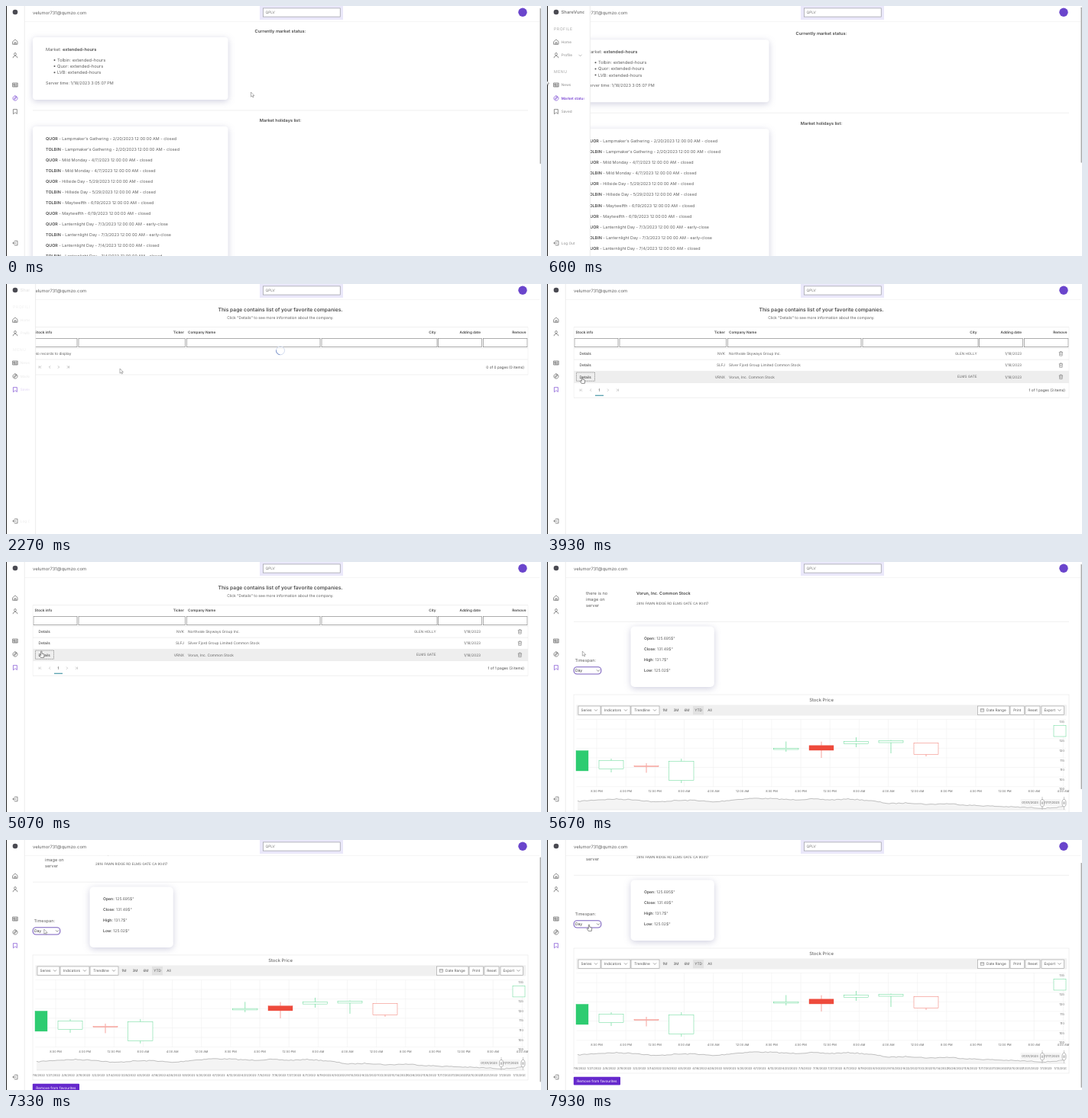
Write an HTML page that moves like this. It is 700 px wide and 328 px high and loops after 7990 ms.

```html
<!DOCTYPE html>
<html lang="en">
<head>
<meta charset="utf-8">
<title>Market dashboard</title>
<style>
html, body { margin: 0; width: 100%; height: 100%; overflow: hidden; background: #fff; }
svg { display: block; width: 700px; height: 328px; font-family: Inter, "Open Sans", sans-serif; }
text { white-space: pre; text-rendering: geometricPrecision; }
.card { fill: #fff; filter: drop-shadow(0 2px 4px rgba(70, 70, 130, .26)); }
.icon { fill: none; stroke: #555; stroke-width: .65; stroke-linejoin: round; stroke-linecap: round; }
.item { fill: #777; }
.active .icon { stroke: #7340d0; }
.active .item { fill: #6528cc; font-weight: 600; }
</style>
</head>
<body>
<svg id="stage" viewBox="0 0 700 328"></svg>
<script>
const LOOP = 7990, STEP = 1000 / 15;
const PURPLE = '#6528cc', GREEN = '#2ecc71', RED = '#ee4a3c';
const $ = id => document.getElementById(id);

// y is the vertical middle of the text line
function txt(x, y, str, size, o = {}) {
  const attr = `font-size="${size}" fill="${o.fill || '#606060'}" text-anchor="${o.at || 'start'}" font-weight="${o.w || 400}"`;
  return `<text x="${x}" y="${(y + size * .36).toFixed(2)}" ${attr} ${o.more || ''}>${str}</text>`;
}
const bold = s => `<tspan font-weight="600" fill="#4c4c4c">${s}</tspan>`;
function rect(x0, y0, x1, y1, fill, more = '') {
  return `<rect x="${x0}" y="${y0}" width="${x1 - x0}" height="${y1 - y0}" fill="${fill}" ${more}/>`;
}
const box = (x0, y0, x1, y1, stroke, sw = .7, fill = '#fff') =>
  rect(x0, y0, x1, y1, fill, `stroke="${stroke}" stroke-width="${sw}"`);
const path = (d, stroke, sw = .7, fill = 'none', more = '') =>
  `<path d="${d}" stroke="${stroke}" stroke-width="${sw}" fill="${fill}" ${more}/>`;
const hline = (x0, x1, y, c = '#e6e6e6') => path(`M${x0} ${y}H${x1}`, c, .6);
const down = (x, y, c = '#666') => path(`M${x - 2} ${y - 1}l2 2l2 -2`, c, .6);

const LIST = [
  ["Lampmaker's Gathering", '2/20'], ['Mild Monday', '4/7'], ['Hillside Day', '5/29'],
  ['Maytwelfth', '6/19', 1], ['Lanternlight Day', '7/3'], ['Lanternlight Day', '7/4']
];

function marketPage() {
  const mid = { at: 'middle', w: 600, fill: '#4c4c4c' };
  let s = txt(359, 33, 'Currently market status:', 5.7, mid);
  s += rect(35, 41, 290.5, 123, '#fff', 'rx="4" class="card"');
  s += txt(52, 56.5, 'Market: ' + bold('extended-hours'), 5.7);
  ['Tolbin', 'Quor', 'LVB'].forEach((name, i) => {
    const y = 71 + 8.1 * i;
    s += `<circle cx="63.5" cy="${y}" r="1" fill="#555"/>` + txt(67, y, name + ': extended-hours', 5.75);
  });
  s += txt(52, 101, 'Server time: 1/18/2023 3:05:07 PM', 5.45);
  s += hline(35, 683, 137) + txt(359, 150.3, 'Market holidays list:', 5.6, mid);
  s += rect(35, 158, 290.5, 400, '#fff', 'rx="4" class="card"');
  LIST.forEach(([name, day, swap], i) => {
    const end = day === '7/3' ? 'early-close' : 'closed';
    for (let k = 0; k < 2; k++) {
      const market = (k === 1) !== !!swap ? 'TOLBIN' : 'QUOR';
      s += txt(52, 174 + 14.05 * (2 * i + k), `${bold(market)} - ${name} - ${day}/2023 12:00:00 AM - ${end}`, 5.4);
    }
  });
  return s;
}

function pager(y, total, pages) {
  const c = pages ? '#aaa' : '#999';
  const left = x => `M${x + 1} ${y - 1.6}l-1.6 1.6l1.6 1.6`;
  const right = x => `M${x - 1} ${y - 1.6}l1.6 1.6l-1.6 1.6`;
  const x = pages ? 80 : 69, z = pages ? 92 : 81;
  return path(`${left(45)}M43.2 ${y - 1.6}v3.2${left(57)}${right(x)}${right(z)}M${z + 1.4} ${y - 1.6}v3.2`, c, .6) +
    (pages ? txt(68.5, y, '1', 4.8, { at: 'middle', fill: '#333' }) + rect(63, y + 6.5, 74, y + 7.6, '#3a8fa0') : '') +
    txt(678, y, `${pages} of ${pages} pages (${total} items)`, 4.76, { at: 'end', fill: '#444' }) +
    hline(35, 683, y + 10) + path(`M35.2 56.5V${y + 10}M683 56.5V${y + 10}`, '#eee', .6);
}

function savedPage() {
  const head = { w: 600, fill: '#444' }, end = { ...head, at: 'end' };
  let s = txt(359, 33.4, 'This page contains list of your favorite companies.', 6.7, { at: 'middle', w: 600, fill: '#4c4c4c' });
  s += txt(359, 43.8, 'Click "Details" to see more information about the company.', 5, { at: 'middle' });
  s += hline(35, 683, 56.5) + txt(37.5, 63.6, 'Stock info', 4.7, head) + txt(238, 63.6, 'Company Name', 4.7, head);
  [[233, 'Ticker'], [562.5, 'City'], [621, 'Adding date'], [680.5, 'Remove']].forEach(([x, t]) => s += txt(x, 63.6, t, 4.7, end));
  [[36, 93], [95, 234.5], [236.5, 411], [413, 564], [565.5, 622.5], [624.5, 682]].forEach(([a, b]) => s += box(a, 71.3, b, 82.7, '#777', .6));
  s += hline(35, 683, 84.3);

  let rows = '';
  [['NVK', 'Northvale Skyways Group Inc.', 'GLEN HOLLY'],
   ['SLFJ', 'Silver Fjord Group Limited Common Stock', ''],
   ['VRNX', 'Vorun, Inc. Common Stock', 'ELMS GATE']].forEach(([tick, name, city], i) => {
    const y = 91.4 + 15.2 * i, r = { at: 'end', fill: '#666' };
    rows += rect(35, y - 7.4, 683, y + 7.8, '#eee', `id="row${i}"`);
    rows += txt(42.5, y, 'Details', 4.8, { fill: '#333' }) + txt(233, y, tick, 4.75, r);
    rows += txt(238, y, name, 4.75) + txt(562.5, y, city, 4.6, r) + txt(621, y, '1/18/2023', 4.75, r);
    rows += path(`M669.8 ${y - 1.8}h5.2M671.5 ${y - 1.8}v-1h1.8v1M670.4 ${y - 1.8}l.3 4.6h3.4l.3 -4.6M671.7 ${y - .6}v2.2M673.1 ${y - .6}v2.2`, '#666', .5);
    rows += hline(35, 683, y + 7.8);
  });
  rows += path('M38.5 116h24v11.3h-24z', '#777', .7, 'none', 'id="focus" stroke-dasharray="1 .6"') + pager(139.2, 3, 1);
  s += `<g id="rows">${rows}</g><g id="empty">${txt(37.5, 91.6, 'No records to display', 4.75)}${hline(35, 683, 99)}${pager(109, 0, 0)}` +
    `<circle cx="359" cy="87.3" r="5.5" fill="none" stroke="#d3dcf0" stroke-width="1"/>` +
    path('M359 81.8a5.5 5.5 0 0 1 5.5 5.5', '#7f97cc', 1, 'none', 'id="spin"') + '</g>';
  return s;
}

// x from, x to, body top, body bottom, wick top, wick bottom, colour, solid
const CANDLES = [
  [38, 54, 247.5, 274, 247.5, 274, GREEN, 1], [68, 100, 260.5, 271.5, 258, 276, GREEN],
  [114, 146, 267.6, 268.6, 264, 276.5, RED], [159.5, 192, 261.5, 286.5, 258, 290, GREEN],
  [296.5, 329, 244.2, 246, 235.5, 249, GREEN], [343, 375, 240.8, 247, 235.7, 257, RED, 1],
  [388.5, 420.5, 235.6, 238.2, 230, 243, GREEN], [434, 466, 234.6, 237, 233.5, 251, GREEN],
  [480, 512, 237.6, 252.5, 237.6, 255, RED], [663, 679, 214.5, 229, 214.5, 229, GREEN]
];

function chart() {
  const mid = { fill: '#555', at: 'middle' };
  let s = box(35, 174, 683, 338, '#e6e6e6', .6) + txt(359, 181, 'Stock Price', 5.9, mid);
  s += rect(38.5, 187.5, 680, 201.5, '#f0f0f0') + rect(191, 189, 205, 200.3, '#e2e2e2');
  [[41, 70, 'Series', 1], [71, 109, 'Indicators', 1], [110, 147, 'Trendline', 1], [563.5, 605, 'Date Range'],
   [606, 624.5, 'Print'], [626, 645, 'Reset'], [647, 676.5, 'Export', 1]].forEach(([a, b, t, menu]) => {
    const shift = menu ? -4 : t === 'Date Range' ? 3.6 : 0;
    s += box(a, 189, b, 200.3, '#999', .6) + txt((a + b) / 2 + shift, 194.6, t, 4.7, mid);
    if (menu) s += down(b - 6, 194.4);
  });
  s += path('M567.2 192.6h4.4v3.8h-4.4zM567.2 194h4.4', '#666', .5);
  [[154.5, '1M'], [169, '3M'], [183, '6M'], [198, 'YTD'], [213, 'All']].forEach(([x, t]) => s += txt(x, 194.6, t, 4.7, mid));

  for (let i = 0; i < 8; i++) {
    const y = 206.5 + 12.6 * i;
    s += hline(38.5, 679, y, '#f0f0f0') + txt(677, y + 3.2, 135 - 5 * i, 4, { at: 'end' });
  }
  const hours = ['8:00 PM', '4:00 PM', '12:00 PM', '8:00 AM', '4:00 AM', '12:00 AM'];
  for (let i = 0; i < 17; i++) {
    const x = 65 + 38.15 * i;
    s += path(`M${x} 206.5V294.7`, '#f0f0f0', .6) + txt(x, 301, hours[i % 6], 3.9, { at: 'middle' });
  }
  CANDLES.forEach(([a, b, top, bot, hi, lo, c, solid]) => {
    const m = (a + b) / 2;
    const shape = path(`M${m} ${hi}V${top}M${m} ${bot}V${lo}`, c, .6) + box(a, top, b, bot, c, .45, solid ? c : '#fff');
    s += `<g stroke-opacity=".85">${shape}</g>`;
  });
  return s + rangeBar();
}

function rangeBar() {
  const knots = [314, 312, 311, 312, 315, 313, 312.5, 315, 312, 310, 310.5, 312, 311, 312, 311, 313, 317, 316, 318, 317, 319, 320, 321, 322, 323, 321];
  let seed = 7, line = '';
  const rnd = () => (seed = seed * 16807 % 2147483647) / 2147483647 - .5;
  for (let x = 40; x <= 677; x += 3) {
    const p = (x - 40) / 25.5, i = Math.min(24, Math.floor(p));
    const y = knots[i] + (knots[i + 1] - knots[i]) * (p - i) + 1.2 * rnd();
    line += `${line ? 'L' : 'M'}${x} ${y.toFixed(1)}`;
  }
  let s = path(`${line}V325H40Z`, 'none', 0, '#f4f4f4') + path(line, '#999', .6) + hline(40, 679, 325, '#ddd');
  [[632, '01/01/2023'], [660, '01/17/2023']].forEach(([x, t]) => {
    s += rect(x - 12.5, 311, x + 12.5, 320.5, '#f6f6f6', 'rx="1"') + txt(x, 315.7, t, 4.1, { at: 'middle' });
  });
  [648, 676.5].forEach(x => {
    s += path(`M${x} 308V325`, '#aaa', .6) + `<ellipse cx="${x}" cy="316.2" rx="2.6" ry="4.8" fill="#fff" stroke="#888" stroke-width=".6"/>` +
      path(`M${x - .7} 314.5v3.4M${x + .7} 314.5v3.4`, '#666', .5);
  });
  let dates = '';
  for (let i = 0; i < 33; i++) {
    const d = new Date(2022, 0, 16 + Math.round(11.3 * i));
    dates += txt(42 + 19.7 * i, 332, `${d.getMonth() + 1}/${d.getDate()}/${d.getFullYear()}`, 3.9, { at: 'middle' });
  }
  return `${s}<g clip-path="url(#axis)">${dates}</g>`;
}

function detailPage() {
  let s = '';
  ['there is no', 'image on', 'server'].forEach((t, i) => s += txt(51, 41 + 8.2 * i, t, 5.7));
  s += txt(117, 41, 'Vorun, Inc. Common Stock', 5.5, { w: 600, fill: '#444' });
  s += txt(117, 54.3, '2816 FAWN RIDGE RD ELMS GATE CA 90417', 4.5);
  s += hline(35, 683, 78.3) + rect(109.5, 84.5, 218.8, 164, '#fff', 'rx="5" class="card"');
  [['Open', '125.695'], ['Close', '131.49'], ['High', '131.7'], ['Low', '125.02']].forEach(([k, v], i) => {
    s += txt(127, 100.3 + 14 * i, `${bold(k + ':')} ${v}$"`, 5.1);
  });
  s += txt(36.5, 129.3, 'Timespan:', 5.6);
  s += rect(35.2, 137.8, 70.8, 147, '#fff', 'rx="4" stroke="#7a5fbe" stroke-width="1.1"');
  s += txt(37, 142.4, 'Day', 5, { fill: '#333' }) + down(67, 142.4, '#444');
  s += chart() + rect(34.8, 342.8, 96, 353.6, PURPLE, 'rx="1"') + txt(65.4, 348.2, 'Remove from favourites', 4.65, { at: 'middle', fill: '#fff' });
  return s;
}

function header() {
  return rect(24, 0, 698, 20.5, '#fff') + hline(24, 698, 20.5, '#eee') + txt(35, 9, 'velumor731@qumzo.com', 5.9) +
    rect(332, 0, 441, 18, '#eae8fa') + box(336.4, 2.9, 437.2, 14.1, '#8c8c94', .6) + txt(339.5, 8.7, 'QPLV', 4.8, { fill: '#777' }) +
    `<circle cx="676" cy="8.2" r="5.7" fill="#6a45cc"/>`;
}

const ICONS = [
  ['home', 47, 'Home', 'M9 46.5L12 44L15 46.5V50.2H9ZM11 50.2V47.8H13V50.2'],
  ['user', 64.6, 'Profile', 'M12 61.6a1.5 1.5 0 1 1 -.01 0M9.2 67.8c0 -3.4 5.6 -3.4 5.6 0'],
  ['news', 103.3, 'News', 'M9 101h6.2v5H9ZM10.2 102.4h1.8v1.6h-1.8ZM13.2 102.5h1M13.2 104h1M10.2 105h4'],
  ['market', 121, 'Market status', 'M12 117.9a3.1 3.1 0 1 1 -.01 0M13.5 119.5l-.9 2.1l-2.1 .9l.9 -2.1Z'],
  ['saved', 138.5, 'Saved', 'M9.8 135.6h4.6v5.9l-2.3 -1.8l-2.3 1.8Z'],
  ['out', 311, 'Log Out', 'M11.4 308.2H15V313.9H11.4M13 311H9M10.5 309.5L9 311L10.5 312.5']
];

function sidebar() {
  const caps = { fill: '#999', more: 'letter-spacing=".5"' };
  let s = rect(0, 0, 24, 328, '#fff', 'id="panel"') + path('M24.3 0V328', '#e4e4e4', .7, 'none', 'id="edge"');
  s += `<circle cx="12" cy="8" r="3.3" fill="#4a4a52"/>`;
  let labels = txt(18.5, 8, 'ShareVund', 5.9, { w: 600, fill: '#666' }) + txt(9, 30, 'PROFILE', 5.2, caps) + txt(9, 86.2, 'MENU', 5.2, caps);
  labels += `<g id="chev">${down(0, 64.8, '#777')}</g>`;
  // labels sit in their own clipped layer, tied to their icon by data-nav
  ICONS.forEach(([id, y, name, d]) => {
    s += `<g data-nav="${id}"><path class="icon" d="${d}"/></g>`;
    labels += `<g data-nav="${id}"><text class="item" x="18.8" y="${y + 1.7}" font-size="4.7">${name}</text></g>`;
  });
  return `${s}<g clip-path="url(#cut)"><g id="labels">${labels}</g></g>` + rect(0, 0, 1, 328, '#222');
}

const ARROW = path('M0 0V6.2L1.5 4.9L2.5 7L3.5 6.5L2.5 4.5H4.4Z', '#666', .5, '#fff', 'id="arrow"');
const HAND = path('M-.7 .6C-.7 -.3 .7 -.3 .7 .6V3.2L3 3.7Q3.8 4 3.7 5L3.3 8.4H-.8L-2.6 5.6Q-2.6 4.6 -1.6 4.9L-.7 5.6Z', '#444', .6, '#fff', 'id="hand"');

$('stage').innerHTML = `<defs><clipPath id="cut"><rect id="cutBox" x="0" y="0" width="16" height="328"/></clipPath>
  <clipPath id="axis">${rect(35, 326, 680, 338, '#fff')}</clipPath></defs>
  ${rect(0, 0, 700, 328, '#fff')}<g id="market">${marketPage()}</g><g id="saved">${savedPage()}</g><g id="detail">${detailPage()}</g>
  ${header()}${rect(698.6, 0, 699.8, 10, '#999', 'id="thumb" rx=".6"')}${sidebar()}<g id="cursor">${ARROW}${HAND}</g>`;

const TRACK = [
  [0, 320.5, 113], [70, 317, 113], [400, 20, 100], [530, -1.5, 97], [800, -1.5, 97], [870, 26, 112], [1130, 40, 121],
  [1250, 40, 121], [1600, 34, 137], [1870, 34, 138], [2000, 82, 132], [2266, 149, 111], [2600, 151, 112], [2740, 151, 112],
  [3530, 46, 124], [3660, 46, 122], [4200, 46, 122], [4333, 46.3, 117], [6870, 46.3, 117], [6933, 49.8, 117],
  [7810, 49.8, 117], [7933, 55, 111]
];

function along(keys, t) {
  const i = keys.findIndex(k => k[0] > t);
  if (i < 0) return keys[keys.length - 1].slice(1);
  const a = keys[i - 1], b = keys[i], p = (t - a[0]) / (b[0] - a[0]);
  return a.slice(1).map((v, j) => v + (b[j + 1] - v) * p);
}

// cubic-bezier(.25, .1, .25, 1), solved by bisection
function ease(p) {
  if (p <= 0 || p >= 1) return Math.min(1, Math.max(0, p));
  const bez = (a, b, u) => 3 * a * u * (1 - u) ** 2 + 3 * b * u * u * (1 - u) + u ** 3;
  let lo = 0, hi = 1;
  for (let i = 0; i < 20; i++) {
    const m = (lo + hi) / 2;
    if (bez(.25, .25, m) < p) lo = m; else hi = m;
  }
  return bez(.1, 1, lo);
}

const show = (id, on) => $(id).setAttribute('display', on ? 'inline' : 'none');
const move = (id, x, y) => $(id).setAttribute('transform', `translate(${x} ${y})`);

function draw(ms) {
  const t = Math.min(119, Math.floor((ms + 4) / STEP)) * STEP + .5;
  const page = t < 2066 ? 'market' : t < 5600 ? 'saved' : 'detail';
  ['market', 'saved', 'detail'].forEach(id => show(id, id === page));

  const rise = 3.3 * ease((t - 20) / 220);
  const [scroll] = along([[0, 0], [7170, 0], [7200, 5], [7400, 32]], t);
  move('market', 0, rise);
  move('detail', 0, -scroll);

  const top = page === 'market' ? 3 - rise * .4 : 3 + scroll * .84;
  show('thumb', page !== 'saved');
  $('thumb').setAttribute('y', top);
  $('thumb').setAttribute('height', page === 'market' ? 204 : 295);

  const open = t < 2000 ? ease((t - 400) / 600) : 1 - ease((t - 2000) / 600);
  const w = 24.5 + 55.5 * open;
  $('panel').setAttribute('width', w);
  move('edge', w - 24.5, 0);
  $('cutBox').setAttribute('width', w - 8);
  $('labels').setAttribute('opacity', Math.min(1, Math.max(0, 2.2 * open - .42)));
  move('chev', w - 13, 0);
  const nav = page === 'market' ? 'market' : 'saved';
  document.querySelectorAll('[data-nav]').forEach(g => g.setAttribute('class', g.dataset.nav === nav ? 'active' : ''));

  const [x, y] = along(TRACK, t);
  const loaded = t >= 2400;
  show('rows', loaded);
  show('empty', !loaded);
  $('spin').setAttribute('transform', `rotate(${t * .4} 359 87.3)`);
  for (let i = 0; i < 3; i++) show('row' + i, Math.floor((y - 84) / 15.2) === i);
  show('focus', t >= 3600);

  const hand = (t > 1400 && t < 1930) || (t > 3460 && t < 5600) || t > 7860;
  show('hand', hand);
  show('arrow', !hand);
  move('cursor', x, y);
}

const start = performance.now();
function tick() {
  draw((performance.now() - start) % LOOP);
  requestAnimationFrame(tick);
}
draw(0);
requestAnimationFrame(tick);
</script>
</body>
</html>
```
